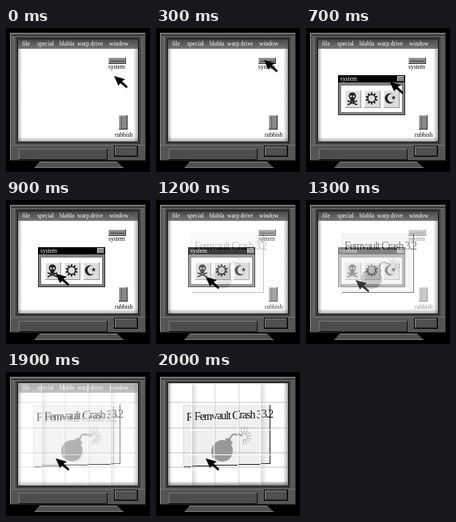
Write an HTML page with a canvas that moves like this. It is 180x180 px and loops after 2.5 s.

```html
<!DOCTYPE html>
<html lang="en">
<head>
<meta charset="utf-8">
<title>Crash</title>
<style>
html, body { margin: 0; height: 100%; overflow: hidden; background: #000; }
canvas { display: block; width: 100vw; height: 100vh; }
</style>
</head>
<body>
<canvas id="stage" width="180" height="180"></canvas>
<script>
const canvas = document.getElementById('stage');
const g = canvas.getContext('2d');
const copy = document.createElement('canvas');
copy.width = copy.height = 180;
const copyCtx = copy.getContext('2d');
const SERIF = '"Liberation Serif", serif';

function rect(x, y, w, h, color) {
  g.fillStyle = color;
  g.fillRect(x, y, w, h);
}

function bevel(x, y, w, h, fill, light, dark) {
  rect(x, y, w, h, dark);
  rect(x, y, w - 1, h - 1, light);
  rect(x + 1, y + 1, w - 2, h - 2, fill);
}

function poly(points, color) {
  g.fillStyle = color;
  g.beginPath();
  points.forEach(p => g.lineTo(p[0], p[1]));
  g.fill();
}

function disc(x, y, r, color) {
  g.fillStyle = color;
  g.beginPath();
  g.arc(x, y, r, 0, 7);
  g.fill();
}

function label(text, x, y, size, color, spacing = 0) {
  g.font = size + 'px ' + SERIF;
  g.letterSpacing = spacing + 'px';
  g.fillStyle = color;
  g.fillText(text, x, y);
}

function fade(x0, y0, x1, y1, from, to) {
  const f = g.createLinearGradient(x0, y0, x1, y1);
  f.addColorStop(0, from);
  f.addColorStop(1, to);
  return f;
}

function withAlpha(alpha, draw) {
  g.save();
  g.globalAlpha = alpha;
  draw();
  g.restore();
}

function television() {
  rect(0, 0, 180, 180, '#000');
  bevel(5, 6, 170, 160, '#555', '#888', '#222');
  rect(7, 9, 166, 1, '#222');
  rect(7, 10, 166, 1, '#777');
  rect(8, 11, 4, 134, '#626262');
  rect(168, 11, 4, 134, '#5c5c5c');
  rect(12, 11, 156, 134, '#333');
  rect(13, 12, 154, 132, '#4c4c4c');
  rect(14, 13, 152, 130, '#111');
  rect(6, 146, 168, 1, '#777');
  bevel(16, 151, 111, 14, '#4c4c4c', '#777', '#111');
  rect(135, 147, 30, 14, '#000');
  bevel(136, 148, 28, 12, '#505050', '#888', '#333');
  poly([[42, 167], [139, 167], [147, 175], [35, 175]], '#505050');
  rect(42, 167, 97, 1, '#888');
  rect(36, 174, 111, 1, '#777');
}

function edges() {
  const clear = 'rgba(90,90,90,0)', shade = 'rgba(90,90,90,.5)';
  rect(15, 14, 5, 128, fade(15, 0, 20, 0, shade, clear));
  rect(159, 14, 6, 128, fade(165, 0, 159, 0, shade, clear));
  rect(15, 136, 150, 6, fade(0, 142, 0, 136, shade, clear));
}

function screen() {
  rect(15, 14, 150, 128, '#fff');
  rect(15, 14, 150, 12, fade(0, 14, 0, 26, '#444', '#777'));
  edges();
  [['file', 20], ['special', 39], ['blabla', 67], ['warp drive', 89], ['window', 129]]
    .forEach(([text, x]) => label(text, x, 22, 7.5, '#fff'));
}

function icons(pressed) {
  bevel(128, 37, 22, 8, pressed ? '#333' : '#888', '#bbb', '#444');
  rect(130, 41, 18, 1, '#444');
  label('system', 128, 51, 7.5, '#000');
  bevel(141, 109, 11, 18, '#888', '#bbb', '#333');
  rect(144, 111, 1, 14, '#666');
  label('rubbish', 136, 136, 7.5, '#000');
}

function skull() {
  g.strokeStyle = '#222';
  g.lineWidth = 1.5;
  g.beginPath();
  g.moveTo(-6, 3); g.lineTo(6, 8);
  g.moveTo(6, 3); g.lineTo(-6, 8);
  g.stroke();
  disc(0, -3, 4.5, '#222');
  rect(-2.5, 0, 5, 4, '#222');
  disc(-1.8, -2.5, 1.2, '#ddd');
  disc(1.8, -2.5, 1.2, '#ddd');
}

function gear() {
  for (let i = 0; i < 10; i++) {
    g.save();
    g.rotate(i * Math.PI / 5);
    rect(-1, -7.5, 2, 4, '#222');
    g.restore();
  }
  disc(0, 0, 5.5, '#222');
  disc(0, 0, 4, '#ddd');
}

function moon() {
  disc(-1, 0, 6.5, '#222');
  disc(1.2, -0.6, 5.3, '#ddd');
  poly(Array.from({ length: 10 }, (_, i) => {
    const r = i % 2 ? 1.2 : 3, a = i * Math.PI / 5 - Math.PI / 2;
    return [3.5 + r * Math.cos(a), r * Math.sin(a) - 1];
  }), '#222');
}

function systemWindow(x, y, scale) {
  g.save();
  g.translate(x, y);
  g.scale(scale, scale);
  rect(0, 0, 84, 50, '#333');
  rect(1, 9, 82, 40, '#808080');
  rect(0, 0, 84, 9, '#000');
  bevel(74, 1, 9, 7, '#888', '#ccc', '#444');
  label('system', 3, 7, 7.5, '#fff');
  rect(4, 13, 76, 33, '#fff');
  [skull, gear, moon].forEach((draw, i) => {
    bevel(9 + i * 24, 19, 20, 22, '#ddd', '#f2f2f2', '#999');
    g.save();
    g.translate(18 + i * 24, 29);
    draw();
    g.restore();
  });
  g.restore();
}

function splash() {
  rect(45, 43, 90, 73, '#222');
  rect(44, 42, 90, 73, '#ddd');
  rect(45, 43, 89, 72, '#f0f0f0');
  label('Fernvault Crash 3.2', 48, 62, 14, '#111', -1.1);
  disc(82, 98, 13, '#999');
  poly([[85, 84], [90, 82], [95, 89], [91, 92]], '#999');
  g.strokeStyle = '#999';
  g.lineWidth = 2;
  g.beginPath();
  g.moveTo(91, 85);
  g.bezierCurveTo(94, 74, 100, 78, 106, 81);
  g.stroke();
  g.lineWidth = 0.8;
  for (let i = 0; i < 9; i++) {
    const a = -2 + i * 0.46, c = Math.cos(a), s = Math.sin(a);
    g.beginPath();
    g.moveTo(108 + 3 * c, 82 + 3 * s);
    g.lineTo(108 + 10 * c, 82 + 10 * s);
    g.stroke();
  }
}

function cursor(x, y) {
  poly([[0, 0], [14, 4], [10, 6.5], [17, 13], [16, 15.5], [8, 9], [5.5, 12]]
    .map(p => [x + p[0], y + p[1]]), '#000');
}

// Replaces the picture by the splash screen, leaving the old one at the given strength.
function dissolve(rest) {
  copyCtx.drawImage(canvas, 0, 0);
  screen();
  splash();
  withAlpha(rest, () => g.drawImage(copy, 0, 0));
}

// Breaks the picture on the screen into glass-like blocks pushed outwards.
function shatter(alpha) {
  copyCtx.drawImage(canvas, 0, 0);
  const xs = [15, 45, 73, 103, 131, 165], dx = [-10, 0, 1, 2, 8];
  const ys = [14, 40, 72, 103, 121, 142], dy = [0, -3, 0, 1, 3];
  withAlpha(alpha, () => {
    rect(15, 14, 150, 128, '#fff');
    for (let r = 0; r < 5; r++) for (let c = 0; c < 5; c++) {
      const x = xs[c], y = ys[r], w = xs[c + 1] - x, h = ys[r + 1] - y;
      const sx = Math.max(15, x - dx[c]), sy = y - dy[r] + (c - 2);
      if (r) g.drawImage(copy, sx, sy, w, h, x, y, w, h);
      const side = c % 3 === 1 ? 6 : 2;
      rect(x, y, side, h, fade(x, 0, x + side, 0, 'rgba(150,150,150,.35)', 'rgba(190,190,190,.15)'));
      rect(x, y + h - 3, w, 2, 'rgba(160,160,160,.3)');
      rect(x, y, w, 1, '#fff');
      rect(x + w - 1, y, 1, h, '#fff');
    }
    edges();
  });
}

function draw(t) {
  const step = Math.floor(t / 100);
  television();
  screen();
  if (step < 14) {
    icons(step === 2);
    if (step === 5 || step === 6) withAlpha(step === 5 ? 1 : 0.6, () => systemWindow(93, 49, 0.405));
    if (step > 5) withAlpha(step === 6 ? 0.5 : 1, () => systemWindow(40, 59, 1));
    if (step > 11) dissolve(step === 12 ? 0.75 : 0.45);
    if (step < 5) cursor(135, 60 - Math.min(step, 3) * 6.7);
    else if (step < 6) cursor(132, 48);
    else if (step < 9) cursor(126 - (step - 6) * 21.3, 55 + (step - 6) * 12.3);
    else withAlpha(step === 13 ? 0.75 : 1, () => cursor(62, 92 + Math.max(0, step - 11) * 4));
  } else {
    splash();
    if (step > 18) {
      shatter(step === 19 ? 0.55 : 1);
      cursor(62, 108);
    }
  }
}

function tick(now) {
  draw(now % 2500);
  requestAnimationFrame(tick);
}
requestAnimationFrame(tick);
</script>
</body>
</html>
```
